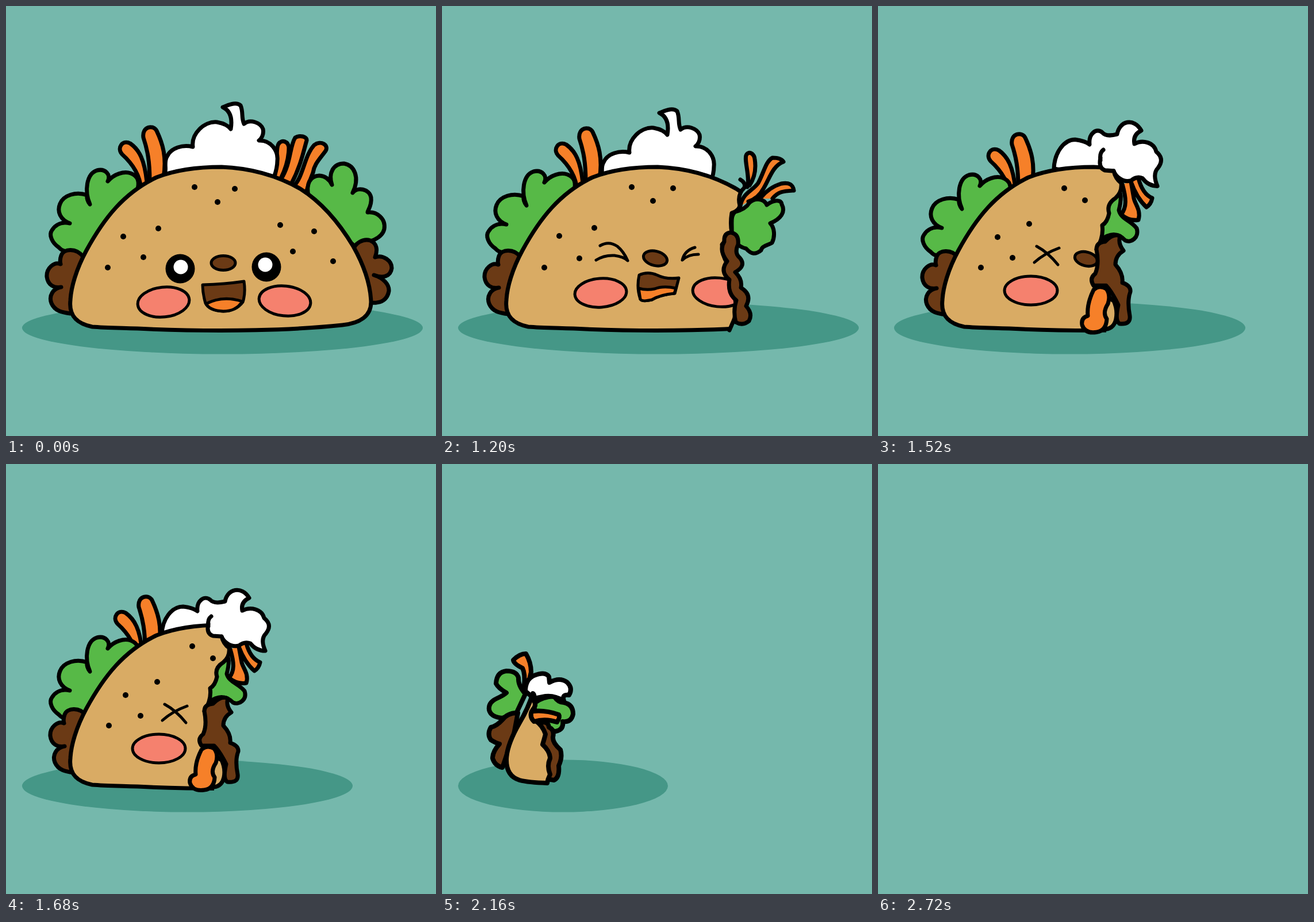
Recreate the animation shown at these times as an HTML page. Size 748 by 748 pixels, loop 2.96 s.

```html
<!DOCTYPE html>
<html lang="en">
<head>
<meta charset="utf-8">
<title>Taco being eaten</title>
<style>
  html, body { margin: 0; width: 100%; height: 100%; overflow: hidden; background: #75b8ac; }
  svg { display: block; width: 100%; height: 100%; }
  .taco { fill: none; stroke: #000; stroke-width: 7; stroke-linejoin: round; stroke-linecap: round; }
  .face { stroke-width: 5; }
  .taco .dot { fill: #000; stroke: none; }
</style>
</head>
<body>
<svg id="stage" viewBox="0 0 748 748"></svg>
<script>
const LOOP = 2960;
const SHELL = '#d9ab64', GREEN = '#57b947', BEEF = '#6b3a15', CARROT = '#f68029', CREAM = '#fff', BLUSH = '#f5816e';

const path = (fill, d) => `<path fill="${fill}" d="${d}"/>`;
const line = d => path('none', d);
const move = (x, y, inner) => `<g transform="translate(${x} ${y})">${inner}</g>`;
const oval = (fill, x, y, rx, ry, turn = 0) =>
  `<ellipse fill="${fill}" rx="${rx}" ry="${ry}" transform="translate(${x} ${y}) rotate(${turn})"/>`;
const dots = (...xy) => xy.map(([x, y]) => `<circle class="dot" cx="${x}" cy="${y}" r="5"/>`).join('');
const eye = (x, y, r, px, py, pr) =>
  `<circle class="dot" cx="${x}" cy="${y}" r="${r}"/><circle fill="#fff" stroke="none" cx="${px}" cy="${py}" r="${pr}"/>`;

const shell = path(SHELL, 'M112 512C113 490 122 458 140 425C170 370 205 325 262 298C300 283 340 280 375 280C425 282 470 294 512 318C550 342 580 378 604 418C622 450 634 485 635 515C635 540 615 552 585 555C500 564 380 567 250 562C200 560 175 560 150 558C125 553 109 540 112 512Z');

// Left side of the filling
const leafL = path(GREEN, 'M128 432C112 428 98 428 92 420C80 412 74 398 80 390C86 380 97 375 111 378C95 372 88 358 94 344C100 329 122 322 141 329Q140 338 146 345C136 322 140 292 158 286C173 282 183 294 177 305C188 292 205 287 217 291C230 296 233 306 228 322L222 338L140 440Z');
const beefL = path(BEEF, 'M134 436C122 420 100 422 96 434Q93 442 95 449C84 444 70 456 71 471C73 486 84 491 96 489C82 491 74 504 79 517C85 531 98 533 112 535L130 500Z');
const sticksL = path(CARROT, 'M235 318C233 295 222 276 202 258C192 247 203 232 216 239C232 250 241 268 245 306')
  + path(CARROT, 'M250 304C250 270 246 250 239 229C236 209 257 206 262 217C272 238 280 262 274 298');
const bentSticksL = path(CARROT, 'M228 318Q210 295 187 290Q180 285 188 268Q205 268 225 285Q240 300 241 312')
  + path(CARROT, 'M247 308Q242 285 238 265Q238 245 245 242Q258 240 265 248Q260 265 263 280Q268 295 262 300');

// Untouched right side and cream
const cream = path(CREAM, 'M276 292C280 285 274 272 280 262C287 246 308 241 325 245C322 222 345 200 367 202Q384 205 391 214C394 196 390 182 377 176C388 172 400 166 408 173C413 184 409 194 414 205C425 196 443 203 447 214C449 224 444 231 440 234C460 233 474 251 472 269Q472 282 466 298Z');
const sticksR = path(CARROT, 'M466 300C475 275 468 250 474 240C480 231 491 236 492 246C492 262 488 280 478 300')
  + path(CARROT, 'M500 314C518 296 518 262 536 242C548 233 562 242 556 252C546 266 536 275 534 290C530 300 526 310 522 325')
  + path(CARROT, 'M478 302C496 274 493 245 503 229C511 224 524 227 523 234C517 255 512 280 496 310');
const leafR = path(GREEN, 'M526 330C522 310 528 296 545 295Q560 296 567 311C560 290 570 274 588 274C606 277 616 298 603 325C611 314 632 318 635 333C637 348 628 357 629 359C645 357 661 370 658 388C654 406 630 411 606 417L560 380Z');
const beefR = path(BEEF, 'M604 426C606 412 622 404 634 408C645 413 647 424 642 437C656 432 671 443 671 456C669 471 655 474 640 468C656 473 667 484 666 496C663 512 652 518 632 516L600 480Z');

// Each bite: edge of the shell (start x, rest of path), filling behind and in front of the shell
const bites = {
  nibble: {
    edge: ['594', '409Q592 414 585 417Q587 432 578 440Q571 455 583 470Q578 482 573 490Q574 506 590 514Q594 525 589 538L602 540L606 551'],
    back: path(GREEN, 'M526 330C524 310 530 296 547 295Q561 296 568 311C561 290 572 274 589 275C608 278 617 298 604 325C614 314 635 320 637 336C638 350 628 356 629 361Q636 372 629 389Q615 391 615 398Q620 408 608 422L594 424L560 380Z')
      + path(BEEF, 'M585 420Q598 413 600 424Q608 430 602 442Q616 450 610 465Q604 474 613 484Q617 496 607 505Q616 525 605 538L585 538Z'),
    front: ''
  },
  chomp: {
    edge: ['474', '302Q484 308 481 316Q468 328 473 347Q472 356 459 360Q456 378 459 394L442 415Q444 440 451 446Q442 462 455 476Q455 498 465 509Q468 535 462 548L455 564'],
    back: path(CARROT, 'M486 315C492 300 479 265 485 258C491 252 498 258 499 266C502 285 498 300 490 312')
      + path(CARROT, 'M508 335C520 320 535 312 545 309Q565 305 567 321C550 322 540 322 530 335')
      + path(CARROT, 'M474 348C478 325 495 322 505 308C515 290 518 270 530 264Q545 264 549 271C530 278 525 300 514 318Q505 335 488 340')
      + path(GREEN, 'M459 395C460 380 456 365 465 358C478 355 485 350 490 342C500 333 515 335 520 346C530 338 545 335 546 345C553 358 545 370 526 378C533 385 535 400 529 412C520 417 512 417 510 425C500 433 493 432 484 422C475 420 465 415 459 395Z'),
    front: path(BEEF, 'M457 394Q445 395 446 410Q436 425 451 444Q437 462 455 476Q451 500 467 512Q461 530 466 550Q478 557 489 548Q496 535 484 522Q495 502 475 490Q478 475 465 463Q485 452 473 438Q463 430 470 415Q472 396 457 394Z')
  },
  gulp: {
    edge: ['352', '278Q348 295 360 299L375 300Q378 313 388 320Q390 335 378 345Q362 355 367 370Q364 385 355 390Q358 410 345 430Q352 445 345 465Q340 478 360 490Q366 512 375 515Q382 530 379 545Q376 560 362 562'],
    back: path(CARROT, 'M405 318Q415 345 432 360Q440 355 442 345Q425 338 418 312')
      + path(CARROT, 'M390 322C397 345 398 360 388 372C395 378 405 383 418 381C423 365 412 355 410 345L405 318')
      + path(CREAM, 'M271 296C272 270 288 248 308 248Q325 250 333 256C331 238 345 228 355 236Q362 244 381 239C385 217 410 211 423 233Q408 240 411 255C425 248 445 252 449 268Q464 280 452 295Q442 305 451 325Q435 325 425 312Q415 308 405 316C390 320 378 308 375 300L340 310Z')
      + path(GREEN, 'M380 335C390 330 388 350 384 365C388 380 405 382 415 395C420 410 405 420 395 415C380 400 365 405 352 415L350 380Z'),
    front: line('M352 282Q350 270 357 265')
      + path(BEEF, 'M345 430Q345 418 360 417Q375 402 386 408Q382 420 392 432Q378 440 378 455Q392 470 390 485Q405 490 404 500Q398 515 403 540Q405 555 385 553Q377 548 383 522Q372 500 362 490L340 490Q332 478 343 470Q350 455 345 430Z')
      + path(CARROT, 'M340 497Q350 488 362 495Q370 505 365 520Q355 535 363 545Q362 565 345 567Q325 570 320 555Q318 543 330 540Q328 520 340 497Z')
  },
  feast: {
    edge: ['262', '305Q305 284 307 302Q297 308 305 325Q309 345 292 355Q283 372 290 393Q273 405 280 418L288 431Q280 440 285 447Q300 455 302 470Q310 490 308 500Q322 510 320 525Q312 540 315 550Q310 560 300 560'],
    back: path(CREAM, 'M268 290C275 272 290 258 310 262Q318 268 322 280C340 275 358 280 358 298Q352 310 360 325Q365 342 352 352Q340 358 330 350L300 310Z')
      + path(GREEN, 'M302 318Q310 305 318 318Q316 330 328 335Q322 350 340 355Q352 355 351 365Q345 380 320 375Q302 385 300 405Q290 415 280 408L290 350Z')
      + line('M332 321L332 349')
      + path(CARROT, 'M305 392Q315 385 330 388Q345 385 348 379Q360 380 355 402Q340 408 310 400Z')
      + path(CARROT, 'M283 415Q300 405 320 412Q335 418 339 425L334 439Q318 432 300 430Q285 430 283 415Z')
      + path(BEEF, 'M285 445Q290 432 305 430Q320 430 316 440Q320 455 330 462Q325 475 334 490Q342 500 335 515Q342 530 337 542Q330 550 318 548L300 520Z'),
    front: ''
  }
};

const squashedCream = path(CREAM, 'M274 296C285 268 305 249 332 253C331 232 348 212 375 215Q390 217 395 223C398 208 394 200 385 197C394 188 406 190 415 203Q410 208 412 216C427 209 446 219 449 232Q451 240 447 244C464 246 480 265 478 285L474 302Z');

// Faces
const happy = dots([328, 315], [398, 318], [368, 341], [265, 387], [204, 401], [177, 455], [239, 437], [477, 381], [536, 392], [499, 427], [569, 444])
  + eye(303, 457, 25.5, 304, 454, 12.5) + eye(453, 454, 25.5, 451, 450, 12.5)
  + oval(BEEF, 378, 447, 21, 12.5) + oval(BLUSH, 274, 515, 45, 26, -6) + oval(BLUSH, 485, 513, 45, 26, 6)
  + path(BEEF, 'M342 485Q380 484 414 479Q417 500 412 515Q400 531 378 531Q353 530 347 517Q342 500 342 485Z')
  + path(CARROT, 'M348 518Q378 503 411 514Q400 531 378 531Q355 530 348 518Z');

const shocked = dots([325, 317], [401, 319], [368, 338], [264, 385], [208, 401], [180, 450], [240, 439], [477, 379], [536, 390], [501, 428], [567, 444])
  + eye(301, 452, 29.5, 303, 449, 17) + eye(453, 449, 29.5, 453, 445, 17)
  + oval(BEEF, 378, 444, 21, 13) + oval(BLUSH, 272, 511, 45, 26, -5) + oval(BLUSH, 486, 509, 45, 26, 6)
  + path(BEEF, 'M342 483Q356 470 378 468Q398 470 415 482L413 510Q412 523 402 523H355Q344 523 344 510Z')
  + path(CARROT, 'M344 511Q358 498 380 499Q402 500 413 510Q412 523 402 523H355Q346 523 344 511Z');

const wincing = dots([330, 315], [402, 317], [367, 339], [265, 386], [204, 400], [178, 455], [239, 439])
  + line('M275 417Q290 408 305 418Q316 427 323 443Q316 436 300 434Q282 433 268 442')
  + line('M440 420Q422 425 418 442Q428 432 446 432')
  + oval(BEEF, 371, 439, 21, 12.5, 14) + oval(BLUSH, 276, 499, 45, 25, -4) + oval(BLUSH, 481, 498, 45, 25, 6)
  + path(BEEF, 'M343 468Q358 461 374 468Q390 476 412 473L405 500Q380 502 365 511Q348 515 345 510Q338 490 343 468Z')
  + path(CARROT, 'M342 491Q355 495 370 492Q385 486 407 491L404 500Q380 502 365 511Q348 515 345 510Z');

const fainted = dots([324, 317], [360, 338], [263, 379], [208, 402], [179, 455], [234, 438])
  + line('M276 418Q295 428 313 450M315 421Q290 430 272 446') + oval(BLUSH, 266, 495, 46, 25);

const faceless = dots([264, 376], [206, 400], [236, 438], [181, 458]) + oval(BLUSH, 262, 499, 45, 25);

const lastBite = '<g stroke-width="8">'
  + path(CARROT, 'M143 385Q145 365 140 355Q125 348 124 341Q135 330 146 330Q155 345 155 362L152 375Z')
  + path(GREEN, 'M105 442Q85 440 82 428Q80 415 95 408Q108 402 112 398Q98 390 94 382Q95 362 112 360Q130 360 133 372Q132 385 145 400L130 432Z')
  + path(BEEF, 'M132 433Q115 432 105 445Q95 456 85 458Q78 470 85 480Q95 486 100 487Q88 500 88 512Q92 525 105 528L125 470Z')
  + path(GREEN, 'M162 415Q175 405 195 404Q202 415 212 415Q228 418 228 435Q225 450 210 448Q212 462 198 465Q185 465 183 455Q170 440 160 425Z')
  + path(CREAM, 'M145 395Q145 375 160 368Q180 360 186 370L187 380Q205 370 218 380Q228 390 221 402Q208 400 212 412Q195 402 180 404L160 408Z')
  + path(BEEF, 'M172 450Q185 447 186 458Q196 462 193 475Q192 485 206 497Q210 510 203 525Q205 545 195 550L183 548L160 500Z')
  + path(SHELL, 'M158 399Q162 402 160 412Q165 420 158 427Q153 440 163 447Q175 455 180 470Q178 478 175 488Q188 500 188 512Q182 525 188 540Q184 548 183 555Q150 554 135 550Q112 543 112 515Q112 490 135 450Q150 425 158 399Z')
  + path(CARROT, 'M160 430Q180 428 203 436Q206 440 200 449Q180 442 160 448Q152 440 156 430Z')
  + '</g>';

let clipCount = 0;

// A bitten taco: the shell and face are cut along the bite edge
function bitten(bite, shift, behind, face) {
  const id = 'bite' + clipCount++, [x, rest] = bite.edge, edge = `M${x} ${rest}`;
  const place = inner => `<g transform="${shift}">${inner}</g>`;
  return `<clipPath id="${id}"><path transform="${shift}" d="${edge}V748H-200V-50H${x}Z"/></clipPath>`
    + behind + place(bite.back)
    + `<g clip-path="url(#${id})">${shell}<g class="face">${face}</g></g>`
    + place(line(edge) + bite.front);
}

const left = (leaf, beef) => move(...leaf, leafL) + move(...beef, beefL);
const early = (dy, stickX) => move(2, dy, sticksL) + move(stickX, dy, sticksR) + move(1, dy, cream) + left([1, dy], [1, dy]);
const winced = move(-3, 3, sticksL) + squashedCream + left([1, 3], [4, 1]);
const drooped = (dy, dx) => move(dx, dy, sticksL) + left([0, dy - 4], [6, 2]);
const still = 'translate(0 0)';

const poses = [
  { at: 0, shade: 725, taco: sticksL + sticksR + cream + leafL + beefL + leafR + beefR + shell + `<g class="face">${happy}</g>` },
  { at: 880, shade: 725, taco: bitten(bites.nibble, still, early(-1, 2), shocked) },
  { at: 1040, shade: 725, taco: bitten(bites.nibble, 'translate(-12 0)', early(4, 0), shocked) },
  { at: 1200, shade: 725, taco: bitten(bites.chomp, 'translate(45 0)', move(0, 2, sticksL) + move(1, 10, cream) + left([1, 2], [3, 1]), wincing) },
  { at: 1360, shade: 662, taco: bitten(bites.chomp, still, winced, wincing) },
  { at: 1520, shade: 639, taco: bitten(bites.gulp, 'matrix(1 0 0 1.05 35 -28)', drooped(12, -6), fainted + oval(BEEF, 362, 440, 20, 12, 14)) },
  { at: 1680, shade: 603, taco: bitten(bites.gulp, still, drooped(20, -8), fainted) },
  { at: 1840, shade: 542, taco: bitten(bites.feast, still, bentSticksL + left([-1, 21], [5, 6]), faceless) },
  { at: 2000, shade: 478, taco: bitten(bites.feast, 'matrix(1 0 0 .894 -60 59)', move(-45, 34, bentSticksL) + left([-1, 30], [6, 6]), faceless) },
  { at: 2160, shade: 393, taco: lastBite },
  { at: 2240, shade: 285, taco: lastBite },
  { at: 2400, shade: 285, taco: '' },
  { at: 2560, shade: 285, taco: '', fade: .5 },
  { at: 2720, shade: 285, taco: '', fade: 0 }
];

const stage = document.getElementById('stage');
stage.innerHTML = poses.map(({ shade, taco, fade = 1 }) => {
  const r = (shade - 28) / 2;
  return `<g display="none"><ellipse fill="#459787" opacity="${fade}" cx="${28 + r}" cy="560" rx="${r}" ry="45.5"/><g class="taco">${taco}</g></g>`;
}).join('');

let shown;
function tick() {
  const t = performance.now() % LOOP;
  const next = stage.children[poses.filter(p => p.at <= t).length - 1];
  if (next !== shown) {
    shown?.setAttribute('display', 'none');
    next.removeAttribute('display');
    shown = next;
  }
  requestAnimationFrame(tick);
}
tick();
</script>
</body>
</html>
```
